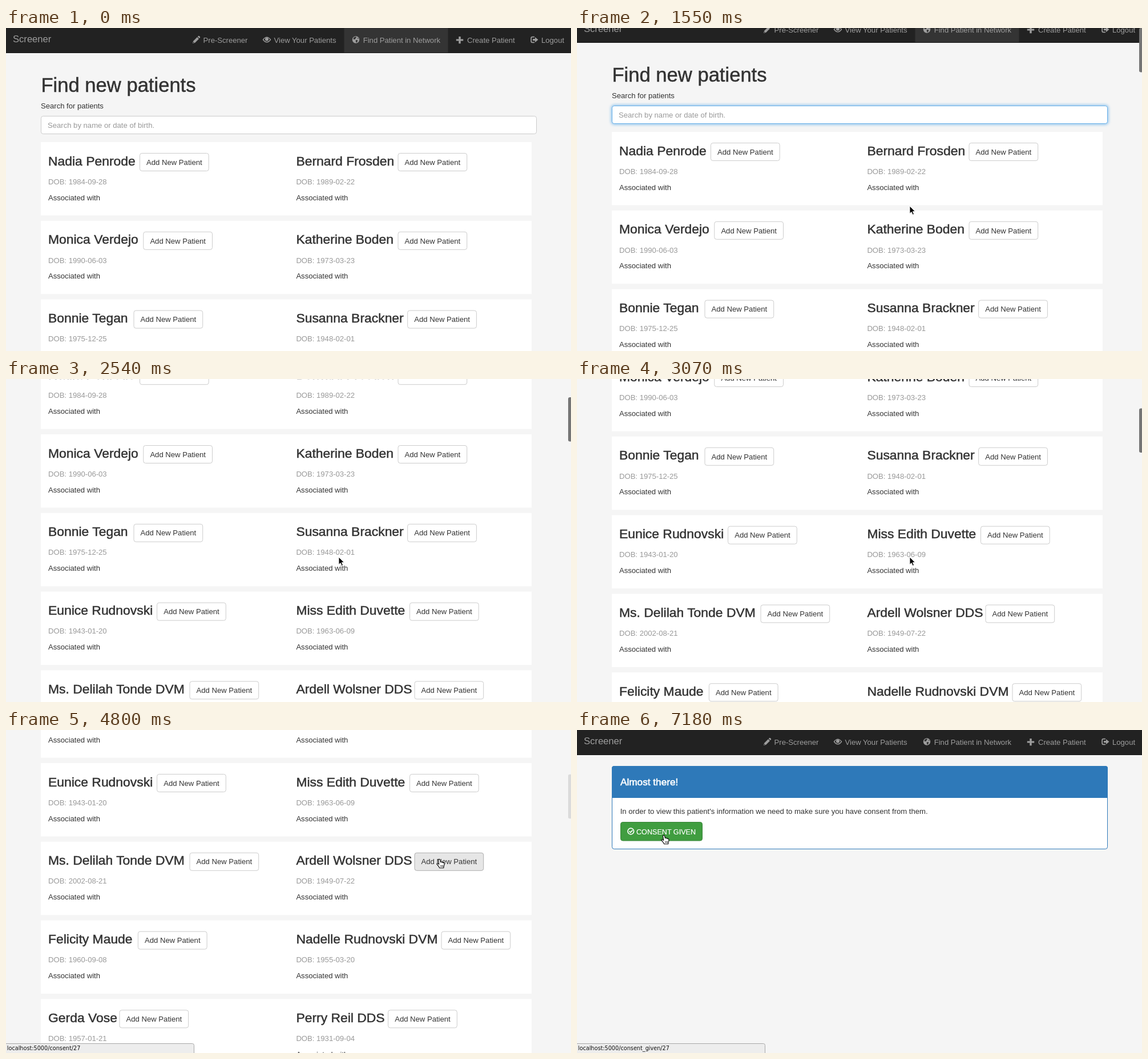
Recreate the animation shown at these times as an HTML page. Size 990 by 566 pixels, loop 8000 ms.

```html
<!DOCTYPE html>
<html lang="en">
<head>
<meta charset="utf-8">
<title>Find new patients</title>
<style>
  html, body { margin: 0; width: 100%; height: 100%; overflow: hidden; background: #f5f5f5; }
  svg { display: block; width: 990px; height: 566px; }
  text { font: 13.1px "Liberation Sans", Arial, sans-serif; fill: #333; white-space: pre; }
  .medium { stroke: #333; stroke-width: .5px; }
  .title { font-size: 34.6px; }
  .name { font-size: 22.9px; }
  .muted { fill: #999; }
  .nav text { fill: #9d9d9d; }
  .nav .brand { font-size: 16.6px; }
  .white { fill: #fff; }
  .heading { font-size: 17.2px; stroke: #fff; stroke-width: .6px; }
  .caps { font-size: 12.6px; stroke: #fff; stroke-width: .2px; }
  .url { font: 9.7px "DejaVu Sans", sans-serif; fill: #111; }
</style>
</head>
<body>
<svg id="stage" viewBox="0 0 990 566"></svg>
<script>
const LOOP = 8000;
const ROW = 137.8;
const stage = document.getElementById('stage');

// name, date of birth, left edge of the button
const patients = [
  ['Nadia Penrode', '1984-09-28', 234.5], ['Bernard Frosden', '1989-02-22', 687],
  ['Monica Verdejo', '1990-06-03', 240.8], ['Katherine Boden', '1973-03-23', 687],
  ['Bonnie Tegan', '1975-12-25', 224], ['Susanna Brackner', '1948-02-01', 703.7],
  ['Eunice Rudnovski', '1943-01-20', 264.6], ['Miss Edith Duvette', '1963-06-09', 707.5],
  ['Ms. Delilah Tonde DVM', '2002-08-21', 322], ['Ardell Wolsner DDS', '1949-07-22', 716],
  ['Felicity Maude', '1960-09-08', 231.4], ['Nadelle Rudnovski DVM', '1955-03-20', 763],
  ['Gerda Vose', '1957-01-21', 199], ['Perry Reil DDS', '1931-09-04', 669.6]
];
const TARGET = 9; // the patient being added

const text = (x, y, s, cls = '') => `<text x="${x}" y="${y}" class="${cls}">${s}</text>`;
const rect = (x, y, w, h, attrs) => `<rect x="${x}" y="${y}" width="${w}" height="${h}" ${attrs}/>`;

function patient([name, dob, bx], i) {
  const x = i % 2 ? 508.4 : 74;
  const y = 200 + Math.floor(i / 2) * ROW;
  const card = i % 2 ? '' : rect(61, y, 860, 128.4, 'fill="#fff"');
  const id = i === TARGET ? 'id="add"' : '';
  return card + text(x, y + 40.6, name, 'name medium') +
    rect(bx, y + 19.5, 120.7, 31, `${id} rx="3.7" fill="#fff" stroke="#ccc"`) +
    text(bx + 11.6, y + 39.7, 'Add New Patient') +
    text(x, y + 73.7, 'DOB: ' + dob, 'muted') +
    text(x, y + 101.6, 'Associated with');
}

const icons = `
  <g fill="#9d9d9d">
    <path d="M327 27l1-4 7-7 3 3-7 7zM335.8 15.2l1.2-1.2q.8-.6 1.6 0l1.3 1.3q.7.8 0 1.6l-1.1 1.2z"/>
    <path d="M327.8 26.2l.5-2 1.5 1.5z" fill="#222"/>
    <path d="M795 15v0h1.7v4.4h4.5v3.2h-4.5v4.6h-3.4v-4.6h-4.5v-3.2h4.5V15z"/>
    <circle cx="613" cy="20.5" r="6.2"/>
    <path d="M609 17l3-1.8 2.2.8-1.8 2.4-1.2 1.5-2.6-.2zM613 21l3.4.6-.6 2-1.8 2.3-1.3-2.6zM616 16.5l2 2-1.6.6z" fill="#333"/>
  </g>
  <g fill="none" stroke="#9d9d9d">
    <path d="M450.5 20.5q6.5-8.6 13 0q-6.500 8.600-13 0z" stroke-width="1.3"/>
    <circle cx="457" cy="19.700" r="2.300" fill="#9d9d9d" stroke-width="1.500"/>
    <path d="M926 15.700h-3.500q-2.300 0-2.300 2v5.600q0 2 2.300 2h3.500" stroke-width="1.800"/>
  </g>
  <path d="M923 19h4v-3l5.500 4.600-5.500 4.600v-3h-4z" fill="#9d9d9d"/>`;

const nav = `<g class="nav">
  ${rect(0, 0, 990, 44, 'fill="#222"')}
  ${rect(592.5, 0, 182, 44, 'id="active" fill="#343434"')}
  ${rect(0, 43, 990, 1, 'fill="#181818"')}
  ${text(12, 25, 'Screener', 'brand')}
  ${text(345.6, 25.7, 'Pre-Screener')}
  ${text(469.5, 25.7, 'View Your Patients')}
  ${text(625.7, 25.7, 'Find Patient in Network')}
  ${text(808, 25.7, 'Create Patient')}
  ${text(938, 25.7, 'Logout')}
  ${icons}</g>`;

const list = `<g id="list">
  ${text(61.5, 112, 'Find new patients', 'title medium')}
  ${text(61, 140.5, 'Search for patients')}
  ${rect(61.5, 154.500, 868, 31, 'id="glow" rx="4" fill="none" stroke="#66afe9" stroke-width="5" filter="url(#blur)"')}
  ${rect(61.5, 154.500, 868, 31, 'id="search" rx="3.7" fill="#fff"')}
  ${text(73, 174.7, 'Search by name or date of birth.', 'muted')}
  ${patients.map(patient).join('')}</g>`;

const consent = `<g id="consent">
  ${rect(61.5, 63.5, 868, 145, 'rx="3.7" fill="#fff" stroke="#2e79b9"')}
  <path d="M61 119V67q0-4 4-4H926q4 0 4 4V119z" fill="#2e79b9"/>
  ${text(76, 97, 'Almost there!', 'white heading')}
  ${text(75.7, 147, "In order to view this patient's information we need to make sure you have consent from them.")}
  ${rect(76.5, 161.5, 143, 32.5, 'id="give" rx="3.7"')}
  <g fill="none" stroke="#fff" stroke-width="1.7">
    <circle cx="94.3" cy="177.500" r="5.300"/><path d="M91.500 177.400l2.200 2.200 3.700-4"/>
  </g>
  ${text(104, 182.7, 'CONSENT GIVEN', 'white caps')}</g>`;

const status = `<g id="status">
  <path d="M-1 549.500H326.500q3 0 3 3V567H-1z" fill="#ededed" stroke="#a8a8a8"/>
  ${text(1.8, 561.3, '', 'url')}</g>`;

const pointers = `<g id="pointer">
  <path id="arrow" d="M0 0V13.300L3.100 10.400 5.200 15.300 7.500 14.300 5.400 9.600H9.500z" fill="#000" stroke="#fff" stroke-width=".9"/>
  <path id="beam" d="M-2.500-6.500Q0-6.500 0-4.500Q0-6.500 2.500-6.500M0-4.500V5.500M-2.500 7.500Q0 7.500 0 5.500Q0 7.500 2.500 7.500M-1.500 2H1.500" fill="none" stroke="#222" stroke-width="1.100"/>
  <g id="hand" fill="#fff" stroke="#000" stroke-width="1.100" stroke-linejoin="round">
    <path d="M-1.500 1.200Q-1.300-.2 0-.1T1.600 1.500L2.400 5Q3.500 4 4.600 5.300Q6 4.600 6.700 5.900Q8.500 5.500 8.800 7.300Q9.300 10 8.200 12.200L7.700 15.300H.6L-.8 12.600-4 8.700Q-4.300 7.200-3 7.200T-.3 9z"/>
    <path d="M2.800 10.500v2.800M4.700 10.500v2.800M6.500 10.500v2.800" fill="none" stroke-width=".8"/>
  </g></g>`;

stage.innerHTML = `<defs><filter id="blur" x="-2%" y="-50%" width="104%" height="200%">
  <feGaussianBlur stdDeviation="2"/></filter></defs>
  ${rect(0, 0, 990, 566, 'fill="#f5f5f5"')}
  <g id="page">${list}${consent}${nav}</g>
  ${rect(985, 0, 9, 77.500, 'id="thumb" rx="3" fill="#757575"')}${status}${pointers}`;

const el = {};
stage.querySelectorAll('[id]').forEach(n => el[n.id] = n);
const label = el.status.querySelector('text');
const show = (node, on) => node.setAttribute('display', on ? 'inline' : 'none');
const set = (node, attrs) => { for (const k in attrs) node.setAttribute(k, attrs[k]); };

const ticks = [0, 500, 650, 800, 950, 1100, 1400, 1570, 1740, 1910, 2270, 2540, 2870, 3020,
  3170, 3310, 3460, 3610, 3900, 4050, 4200, 4800, 4950, 5550, 5700, 5850, 6150,
  6440, 6590, 6740, 6890, 7030, 7180];

const scrollPath = [[1100, 0], [1400, 18], [1570, 75], [1740, 120], [1910, 137], [2270, 206],
  [2540, 240.8], [2870, 310], [3310, 500], [3460, 549.6], [3610, 553.500], [3900, 555.400]];
const pointerPath = [[500, 575, 172], [800, 577, 205], [1100, 583, 312], [3900, 583, 312],
  [4050, 690, 262], [4200, 759, 226.500], [6150, 759, 226.500], [6440, 730, 225],
  [6740, 440, 208], [7030, 185, 190], [7180, 152, 184.500]];

function along(path, t) {
  if (t <= path[0][0]) return path[0].slice(1);
  const i = path.findIndex(k => k[0] > t);
  if (i < 0) return path[path.length - 1].slice(1);
  const a = path[i - 1], b = path[i];
  const p = (t - a[0]) / (b[0] - a[0]);
  return a.slice(1).map((v, n) => v + (b[n + 1] - v) * p);
}

function draw(time) {
  const t = ticks.filter(k => k <= time).pop();
  const onConsent = t >= 6150;
  const scroll = onConsent ? 0 : along(scrollPath, t)[0];
  const [x, y] = along(pointerPath, t);

  set(el.page, { transform: `translate(0 ${-scroll})` });
  show(el.list, !onConsent);
  show(el.consent, onConsent);
  show(el.active, !onConsent);

  const focused = t >= 500;
  show(el.glow, focused);
  set(el.glow, { opacity: t === 500 ? .3 : .6 });
  set(el.search, { stroke: focused ? '#66afe9' : '#ccc' });

  const overAdd = !onConsent && t >= 4200;
  const pressed = t === 5550;
  set(el.add, { fill: pressed ? '#d4d4d4' : overAdd ? '#e6e6e6' : '#fff',
    stroke: pressed ? '#8c8c8c' : overAdd ? '#adadad' : '#ccc' });

  const overGive = onConsent && x < 220;
  set(el.give, { fill: overGive ? '#409d40' : '#5cb85c', stroke: overGive ? '#398439' : '#4cae4c' });

  show(el.status, overAdd || overGive);
  label.textContent = 'localhost:5000/' + (onConsent ? 'consent_given/27' : 'consent/27');

  show(el.thumb, t >= 1400 && t < 4950);
  set(el.thumb, { y: Math.max(0, scroll * .1454 - 3), opacity: t === 4800 ? .2 : 1 });

  const hand = overAdd || overGive;
  const beam = (t >= 500 && t < 800) || t === 1910;
  show(el.pointer, t >= 500);
  show(el.hand, hand);
  show(el.beam, beam);
  show(el.arrow, !hand && !beam);
  set(el.pointer, { transform: `translate(${x} ${y})` });
}

function frame() {
  draw(performance.now() % LOOP);
  requestAnimationFrame(frame);
}
frame();
</script>
</body>
</html>
```
